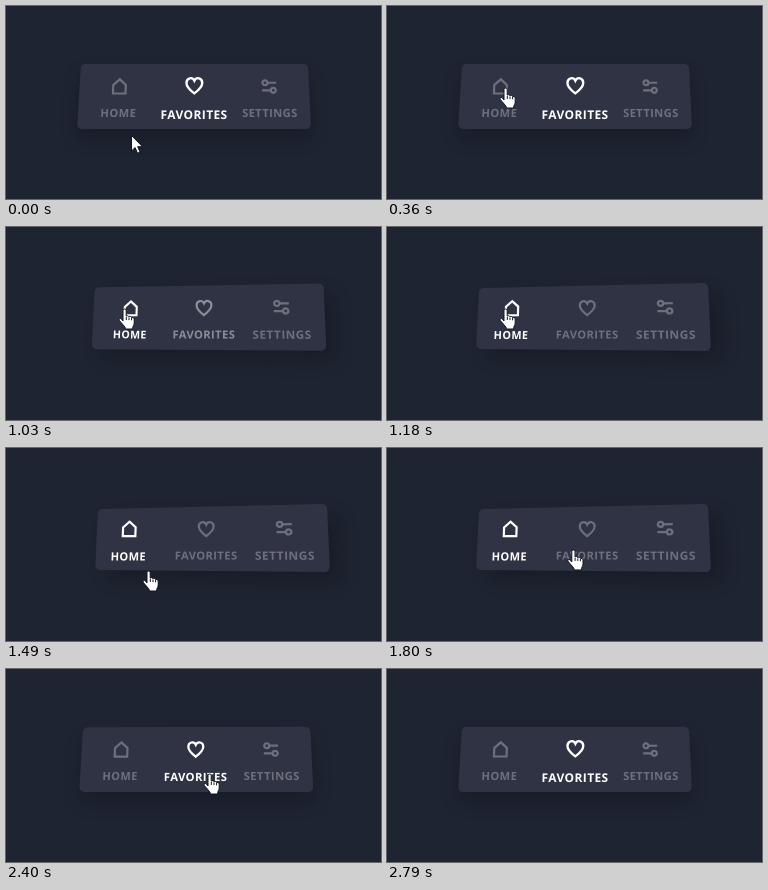
Animation, 375 px wide and 193 px high, one loop 3.32 s. Source, as an HTML page with a canvas:

```html
<!DOCTYPE html>
<html lang="en">
<head>
<meta charset="utf-8">
<title>Tilting menu</title>
<style>
  html, body { margin: 0; width: 100%; height: 100%; overflow: hidden; background: #1e2431; }
  canvas { display: block; width: 375px; height: 193px; }
</style>
</head>
<body>
<canvas id="stage" width="375" height="193"></canvas>
<script>
const ctx = document.getElementById('stage').getContext('2d');
const LOOP = 3320;
const W = 230, H = 65;

// The picture advances in bursts: start, step and last index; it holds in between.
const BURSTS = [[0, 120, 3], [790, 120, 1], [1030, 152, 10], [2670, 120, 1]];

// Cursor stops: time, x, y.
const STOPS = [[0, 125, 129], [360, 112, 81], [1330, 112, 81], [1490, 136, 122], [1640, 160, 131],
  [1950, 187, 90], [2100, 187, 90], [2400, 197, 104], [2790, 214, 205]];

// Corners clockwise from top left, at rest and tilted.
const REST = [[75, 58], [302, 58], [305, 123], [71, 123]];
const TILT = [[92, 61], [321, 56], [324, 124], [89, 122]];

const ICONS = {
  home: new Path2D('M-6.3 7V-1.7L0-7.3L6.3-1.7V7Z'),
  heart: new Path2D('M0 7.3C-3.5 4.6-7.4 1.6-7.4-2.6C-7.4-7.4-1.8-8.6 0-4.6C1.8-8.6 7.4-7.4 7.4-2.6C7.4 1.6 3.5 4.6 0 7.3Z'),
  sliders: new Path2D('M-1.6-3.8H7.2M-6.6-3.8a2.5 2.5 0 1 1 5 0a2.5 2.5 0 1 1-5 0Z' +
    'M1.6 3.8H-7.2M1.6 3.8a2.5 2.5 0 1 1 5 0a2.5 2.5 0 1 1-5 0Z')
};
const ARROW = new Path2D('M.5.5V16l3.6-3.4 2.5 5.7 2.5-1.1-2.4-5.5H11.5Z');
const HAND = new Path2D('M5 13V2.6a1.6 1.6 0 0 1 3.2 0V8.2c.8-.9 2.3-.6 2.7.5.9-.7 2.2-.3 2.5.7' +
  '1.2-.4 2.8.3 2.8 1.7V15c0 2-1.3 3-1.5 4.5V21H7.2V19.6C5.8 17.5 3.2 14.8 1.4 12.6C.5 11 2 9.9 3.2 10.8Z');
const KNUCKLES = new Path2D('M8.3 9v3M11 9.5v2.6M13.6 10v2.3');

const lerp = (a, b, k) => a + (b - a) * k;

function ease(t, from, to) {
  const u = Math.min(1, Math.max(0, (t - from) / (to - from)));
  return u * u * (3 - 2 * u);
}

// Rises to 1, stays, and falls back to 0.
const pulse = (t, riseFrom, riseTo, fallFrom, fallTo) =>
  ease(t, riseFrom, riseTo) - ease(t, fallFrom, fallTo);

function hold(time) {
  const [start, step, last] = BURSTS.findLast(burst => burst[0] <= time);
  let held = start;
  for (let i = 1; i <= last; i++) {
    const next = start + Math.round(i * step / 10) * 10;
    if (next <= time) held = next;
  }
  return held;
}

function cursorAt(t) {
  const i = STOPS.findIndex(stop => stop[0] > t);
  if (i < 0) return STOPS[STOPS.length - 1].slice(1);
  const [t0, x0, y0] = STOPS[i - 1], [t1, x1, y1] = STOPS[i];
  const k = 1 - ((t1 - t) / (t1 - t0)) ** 2;
  return [lerp(x0, x1, k), lerp(y0, y1, k)];
}

// Perspective map from panel coordinates to the stage.
function projector([[x0, y0], [x1, y1], [x2, y2], [x3, y3]]) {
  const dx1 = x1 - x2, dx2 = x3 - x2, sx = x0 - x1 + x2 - x3;
  const dy1 = y1 - y2, dy2 = y3 - y2, sy = y0 - y1 + y2 - y3;
  const det = dx1 * dy2 - dx2 * dy1;
  const g = (sx * dy2 - dx2 * sy) / det;
  const h = (dx1 * sy - sx * dy1) / det;
  return (x, y) => {
    const u = x / W, v = y / H, w = g * u + h * v + 1;
    return [
      ((x1 - x0 + g * x1) * u + (x3 - x0 + h * x3) * v + x0) / w,
      ((y1 - y0 + g * y1) * u + (y3 - y0 + h * y3) * v + y0) / w
    ];
  };
}

// Runs draw with its origin at a panel point, following the local tilt.
function drawAt(project, x, y, scale, draw) {
  const [px, py] = project(x, y);
  const [rx, ry] = project(x + 1, y);
  const [bx, by] = project(x, y + 1);
  ctx.save();
  ctx.transform(rx - px, ry - py, bx - px, by - py, px, py);
  ctx.scale(scale, scale);
  draw();
  ctx.restore();
}

function drawPanel(corners, pose) {
  const [tl, tr, br, bl] = corners;
  ctx.save();
  ctx.beginPath();
  ctx.moveTo((tl[0] + tr[0]) / 2, (tl[1] + tr[1]) / 2);
  for (const [a, b] of [[tr, br], [br, bl], [bl, tl], [tl, tr]]) ctx.arcTo(...a, ...b, 5);
  ctx.closePath();
  ctx.shadowColor = 'rgba(8, 10, 18, .24)';
  ctx.shadowBlur = 18;
  ctx.shadowOffsetX = 12 * pose;
  ctx.shadowOffsetY = 10;
  ctx.fillStyle = '#2f3344';
  ctx.fill();
  ctx.restore();
}

function drawItem(project, label, icon, x, glow = 0, lift = 0) {
  const scale = 1 + .07 * lift, mid = 36;
  const ink = `rgba(255, 255, 255, ${lerp(.3, 1, glow)})`;
  drawAt(project, x, mid + (23 - mid) * scale, scale, () => {
    ctx.strokeStyle = ink;
    ctx.lineWidth = 2.2;
    ctx.stroke(ICONS[icon]);
  });
  drawAt(project, x, mid + (53.7 - mid) * scale, scale, () => {
    ctx.fillStyle = ink;
    ctx.font = '700 11px "Open Sans", sans-serif';
    ctx.letterSpacing = '0.4px';
    ctx.textAlign = 'center';
    ctx.fillText(label, 0, 0);
  });
}

function drawCursor(x, y) {
  const overPanel = y < 126;
  const shape = overPanel ? HAND : ARROW;
  ctx.save();
  ctx.translate(x, y);
  ctx.lineJoin = 'round';
  ctx.strokeStyle = '#11141c';
  ctx.fillStyle = '#fff';
  ctx.fill(shape);
  ctx.stroke(shape);
  if (overPanel) ctx.stroke(KNUCKLES);
  ctx.restore();
}

function render(now) {
  const t = hold(now % LOOP);
  const pose = pulse(t, 640, 1180, 2075, 2490);
  const homeGlow = pulse(t, 790, 1030, 2100, 2400);
  const homeLift = pulse(t, 980, 1330, 2100, 2400);
  const favGlow = 1 - pulse(t, 790, 1130, 2100, 2400);
  const favLift = 1 - pulse(t, 640, 1030, 2250, 2790);
  const corners = REST.map((p, i) => p.map((v, j) => lerp(v, TILT[i][j], pose)));
  const project = projector(corners);

  ctx.fillStyle = '#1e2431';
  ctx.fillRect(0, 0, 375, 193);
  drawPanel(corners, pose);
  drawItem(project, 'HOME', 'home', 40 - 4.7 * homeLift, homeGlow, homeLift);
  drawItem(project, 'FAVORITES', 'heart', 115, favGlow, favLift);
  drawItem(project, 'SETTINGS', 'sliders', 190, 0, 0);
  drawCursor(...cursorAt(t));
}

const start = performance.now();
function tick() {
  render(performance.now() - start);
  requestAnimationFrame(tick);
}
tick();
</script>
</body>
</html>
```
